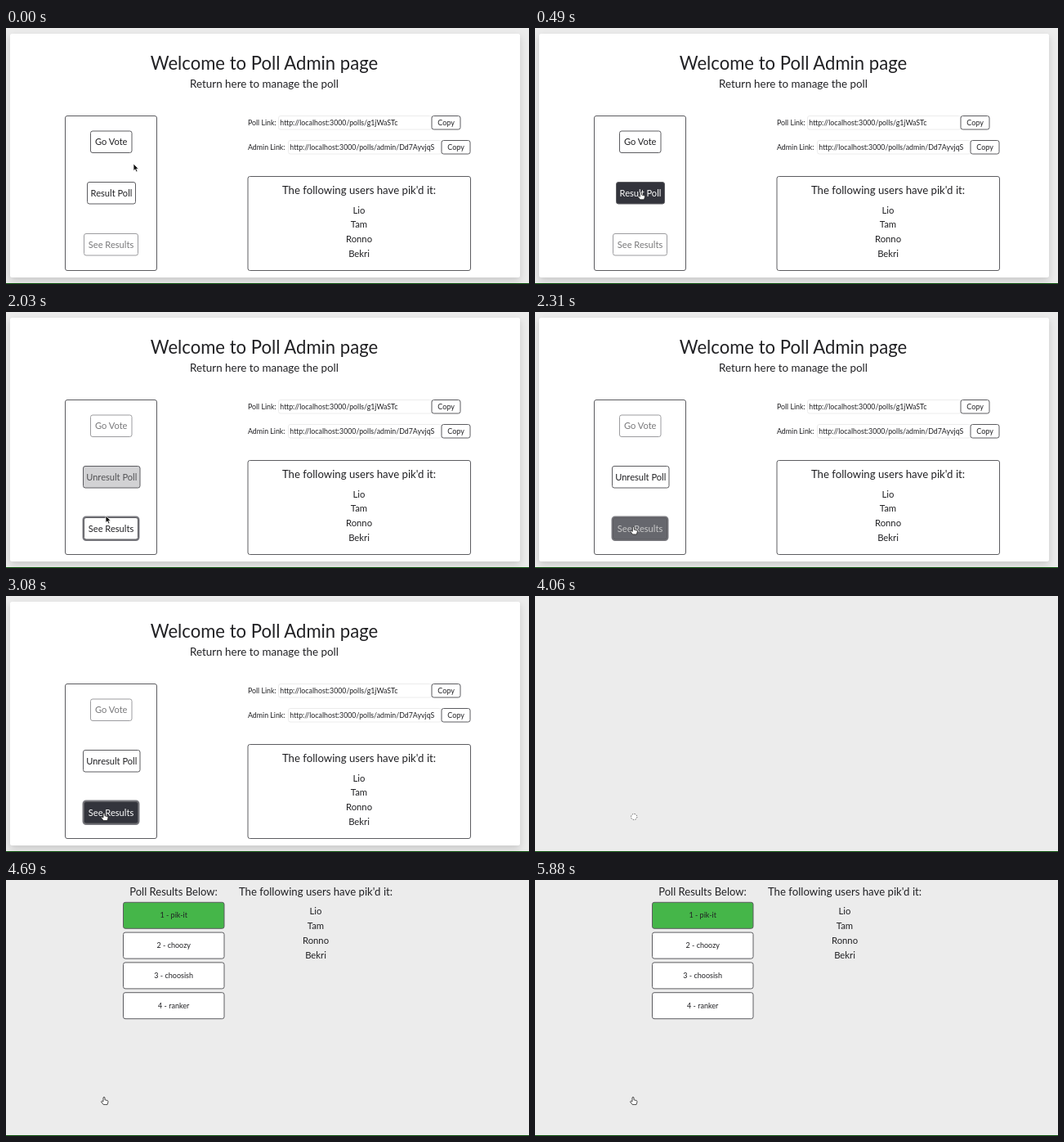
Write an HTML page that moves like this. It is 640 by 313 pixels and loops after 5.95 s.

```html
<!DOCTYPE html>
<html lang="en">
<head>
<meta charset="utf-8">
<title>Poll admin</title>
<style>
  html, body { margin: 0; height: 100%; overflow: hidden; background: #ececec; }
  svg { display: block; width: 640px; height: 313px; font-family: Lato, "Open Sans", sans-serif; }
  text { fill: #212124; white-space: pre; }
  rect { fill: #fff; stroke: #5c5c60; }
  .card { stroke: none; filter: drop-shadow(0 4px 5px rgba(0, 0, 0, .15)); }
  .input { stroke: #ececec; }
  .win { fill: #45b649; }
  .ring { fill: none; stroke: #34343c; stroke-width: 4; }
</style>
</head>
<body>
<svg viewBox="0 0 640 313">
  <g id="admin"></g>
  <g id="results"></g>
  <path d="M0 312.5H640" stroke="#0a500a"/>
  <g id="cursor">
    <path id="arrow" d="M0 0V8.6L2 6.8L3.5 10L5 9.3L3.6 6.2H6.2Z" fill="#111" stroke="#fff" stroke-width=".7"/>
    <path id="hand" d="M-1 5.5V1Q0-.5 1 1V3.8L4.2 4.6Q5 5 5 6.2L4 9.6H-.8L-3.6 6Q-3 4.4-1 6Z" fill="#fff" stroke="#222" stroke-width=".8"/>
    <circle id="wait" cx="1.2" cy="5" r="3.6" fill="#fff" stroke="#333" stroke-width=".8" stroke-dasharray="1.4 1.4"/>
  </g>
</svg>
<script>
const $ = id => document.getElementById(id);
const LOOP = 5950, STEP = 70;
const WHITE = [255, 255, 255], DARK = [51, 52, 60], INK = [33, 33, 36];
const voters = ['Lio', 'Tam', 'Ronno', 'Bekri'];

const text = (x, y, size, str, anchor = 'middle') =>
  `<text x="${x}" y="${y}" font-size="${size}" text-anchor="${anchor}">${str}</text>`;
const box = (x, y, w, h, cls = '') =>
  `<rect class="${cls}" x="${x}" y="${y}" width="${w}" height="${h}" rx="2.5"/>`;
const button = (id, x, y, w, h, size, label) =>
  `<g id="${id}">${box(x, y, w, h, 'ring')}${box(x, y, w, h, 'face')}` +
  text(x + w / 2, y + h / 2 + size * .36, size, label) + '</g>';
const voterList = (x, y) =>
  text(x, y, 13.2, "The following users have pik'd it:") +
  voters.map((name, i) => text(x, y + 23.5 + i * 17.8, 11.3, name)).join('');
const linkRow = (y, label, inputX, inputW, url) =>
  text(296, y + 11.3, 8.8, label, 'start') +
  box(inputX, y, inputW, 16.5, 'input') +
  text(inputX + 1.8, y + 11.3, 8.8, url, 'start') +
  button('copy' + y, inputX + inputW, y, 35, 16.5, 9, 'Copy');

$('admin').innerHTML =
  box(5, 7, 624, 298, 'card') +
  text(316, 50.5, 22.1, 'Welcome to Poll Admin page') +
  text(316, 72.5, 13.4, 'Return here to manage the poll') +
  box(72.5, 107.5, 112, 189) +
  button('vote', 103.5, 126, 50.5, 26.5, 11.1, 'Go Vote') +
  button('close', 99.5, 188.5, 59, 26.5, 11.1, 'Result Poll') +
  button('reopen', 94.5, 188.5, 69.5, 26.5, 11.1, 'Unresult Poll') +
  button('see', 95.5, 251.5, 66, 26.5, 11.1, 'See Results') +
  linkRow(107.5, 'Poll Link:', 333.5, 187.5, 'http://localhost:3000/polls/g1jWaSTc') +
  linkRow(137.5, 'Admin Link:', 345.5, 187.5, 'http://localhost:3000/polls/admin/Dd7AyvjqS') +
  box(296, 181.5, 272.5, 115) +
  voterList(432, 203);

$('results').innerHTML =
  text(205, 18.8, 13, 'Poll Results Below:') +
  ['pik-it', 'choozy', 'choosish', 'ranker'].map((name, i) =>
    box(143.5, 27.3 + i * 36.8, 123.5, 32, i ? '' : 'win') +
    text(205.2, 46.2 + i * 36.8, 9, `${i + 1} - ${name}`)).join('') +
  voterList(379, 18.8);

// Piecewise linear value from [time, ...values] keys
function along(t, keys) {
  const i = keys.findIndex(k => k[0] > t);
  if (i < 0) return keys.at(-1).slice(1);
  if (i === 0) return keys[0].slice(1);
  const a = keys[i - 1], b = keys[i], p = (t - a[0]) / (b[0] - a[0]);
  return a.slice(1).map((v, j) => v + (b[j + 1] - v) * p);
}
const ramp = (t, from, to) => Math.min(1, Math.max(0, (t - from) / (to - from)));
const mix = (a, b, p) => `rgb(${a.map((v, i) => v + (b[i] - v) * p)})`;
const show = (id, on) => $(id).style.display = on ? '' : 'none';

function paint(id, { hover = 0, ring = 0, enabled = 1 } = {}) {
  const g = $(id);
  g.style.opacity = .6 + .4 * enabled;
  g.querySelector('.face').style.fill = mix(WHITE, DARK, hover);
  g.querySelector('text').style.fill = mix(INK, WHITE, hover);
  g.querySelector('.ring').style.opacity = ring * .65;
}

const path = [
  [0, 156, 166], [140, 149, 175], [280, 138, 190], [420, 131, 199], [560, 128, 201.5],
  [840, 128, 201.5], [910, 127.5, 201], [1120, 128.5, 201.5], [1750, 128.5, 201.5],
  [1820, 127.5, 207], [1890, 126, 223], [2030, 122, 249], [2170, 121, 257], [2380, 120, 265]
];

function draw(t) {
  const closed = t >= 1400, left = t >= 4060;
  show('admin', !left);
  show('results', left);
  $('results').style.opacity = ramp(t, 4060, 4550);

  show('close', !closed);
  show('reopen', closed);
  paint('vote', { enabled: 1 - ramp(t, 1330, 1540) });
  paint('close', { hover: ramp(t, 210, 420), ring: ramp(t, 1190, 1260) });
  paint('reopen', { hover: along(t, [[1890, 1], [2030, .22], [2170, 0]])[0] });
  paint('see', {
    hover: ramp(t, 2100, 2380),
    ring: ramp(t, 1330, 1610),
    enabled: ramp(t, 1330, 1540)
  });

  const waiting = t >= 4060 && t < 4130;
  const pointing = (t >= 280 && t < 1890) || t >= 2170;
  $('cursor').setAttribute('transform', `translate(${along(t, path)})`);
  show('wait', waiting);
  show('hand', pointing && !waiting);
  show('arrow', !pointing);
}

['copy107.5', 'copy137.5'].forEach(id => paint(id));
const start = performance.now();
(function tick() {
  const t = (performance.now() - start) % LOOP;
  draw(Math.floor(t / STEP) * STEP);
  requestAnimationFrame(tick);
})();
</script>
</body>
</html>
```
